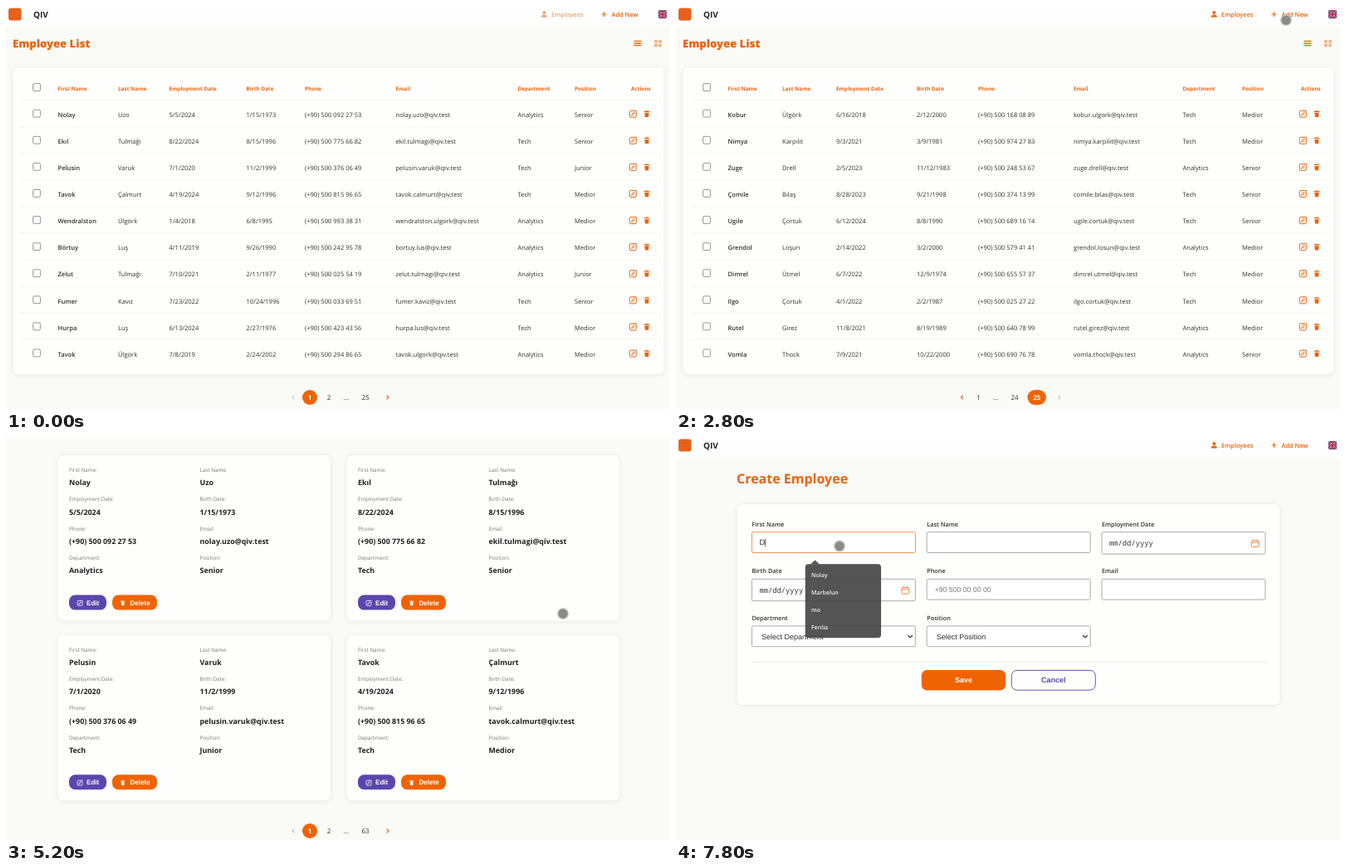
These frames come from a looping animation (800x486 px, 8 s). An HTML page:

```html
<!DOCTYPE html>
<html lang="en">
<head>
<meta charset="utf-8">
<title>Employee list</title>
<style>
html, body { margin: 0; width: 100%; height: 100%; overflow: hidden; background: #fafaf7; }
svg { display: block; width: 100%; height: 100%; font-family: "Open Sans", "Noto Sans", sans-serif; text-rendering: geometricPrecision; }
text { white-space: pre; }
</style>
</head>
<body>
<svg id="stage" viewBox="0 0 800 486"></svg>
<script>
const ORANGE = '#ec6209', FILL = '#f06303', PURPLE = '#5a46ad', INK = '#303030';
const ARIAL = 'font-family="Liberation Sans, Arial, sans-serif"';
const MONO = 'font-family="Noto Sans Mono, DejaVu Sans Mono, monospace"';
const stage = document.getElementById('stage');

// Drawing helpers
const text = (x, y, s, size, fill = INK, weight = 400, extra = '') =>
  `<text x="${x}" y="${y}" font-size="${size}" fill="${fill}" font-weight="${weight}" ${extra}>${s}</text>`;
const centered = (x, y, s, size, fill, weight, extra = '') =>
  text(x, y, s, size, fill, weight, 'text-anchor="middle" ' + extra);
const rect = (x, y, w, h, r, fill, extra = '') =>
  `<rect x="${x}" y="${y}" width="${w}" height="${h}" rx="${r}" fill="${fill}" ${extra}/>`;
const line = (d, stroke, width = 1) =>
  `<path d="${d}" fill="none" stroke="${stroke}" stroke-width="${width}" stroke-linecap="round" stroke-linejoin="round"/>`;
const group = (id, content, extra = '') => `<g id="${id}" ${extra}>${content}</g>`;
const at = (x, y, content, scale = 1) => `<g transform="translate(${x} ${y}) scale(${scale})">${content}</g>`;
const panel = (x, y, w, h) =>
  rect(x, y, w, h, 7, '#fefefd', 'stroke="#eeede9" stroke-width=".8" filter="url(#shadow)"');

// Icons, drawn around their centre
const pencil = color => line('M1 -4H-2.6Q-4 -4 -4 -2.6V2.6Q-4 4 -2.6 4H2.6Q4 4 4 2.6V-4H1', color, 1) +
  line('M-1.6 1.6L-1.2 .2L1.4 -2.2L2.2 -1.4L-.3 1.2Z', color, .9);
const trash = color => `<path fill="${color}" d="M-3.4 -3.4H-1.3V-4H1.3V-3.4H3.4V-2.3H-3.4ZM-2.6 -1.4H2.6L2.1 3.8H-2.1Z"/>`;
const person = `<circle cy="-2" r="1.9" fill="${ORANGE}"/><path fill="${ORANGE}" d="M-3.4 3.6V2.2Q-3 .6 0 .6T3.4 2.2V3.6Z"/>`;
const calendar = rect(-4.3, -3.3, 8.6, 7.6, 1, 'none', 'stroke="#ee8a45"') +
  line('M-4.3 -1H4.3M-2.2 -4.4V-3M2.2 -4.4V-3', '#ee8a45');
const flag = rect(-5, -5, 10, 10, 0, '#2c2c72') +
  line('M-4.5 -4.5L4.5 4.5M-4.5 4.5L4.5 -4.5', '#dcc8d4', 1.6) +
  line('M-4.5 -4.5L4.5 4.5M-4.5 4.5L4.5 -4.5', '#b8304c', .8) +
  `<path d="M0 -5V5M-5 0H5" stroke="#e4ccd4" stroke-width="2.4"/><path d="M0 -5V5M-5 0H5" stroke="#c0203c" stroke-width="1.6"/>`;

// Each record: first name, last name, hired, born, department, position
const records = source => source.trim().split('\n').map(row => row.trim().split(' '));
const pages = [
  records(`
    Nolay Uzo 5/5/2024 1/15/1973 A S
    Ekıl Tulmağı 8/22/2024 8/15/1996 T S
    Pelusin Varuk 7/1/2020 11/2/1999 T J
    Tavok Çalmurt 4/19/2024 9/12/1996 T M
    Wendralston Ülgörk 1/4/2018 6/8/1995 A M
    Börtuy Luş 4/11/2019 9/26/1990 A M
    Zelut Tulmağı 7/10/2021 2/11/1977 A J
    Fumer Kavız 7/23/2022 10/24/1996 T S
    Hurpa Luş 6/13/2024 2/27/1976 T M
    Tavok Ülgörk 7/8/2019 2/24/2002 A M`),
  records(`
    Helduba Plenk 8/26/2024 6/26/2000 T J
    İlgutem Corvel 6/16/2023 5/20/1978 A J
    Nuf Bılaş 12/26/2019 12/28/1983 T S
    Melva Trembol 4/13/2023 7/20/1992 A S
    Quela Sorp 4/22/2020 7/13/2004 T S
    İpşu Girez 11/11/2024 11/9/1993 A J
    Tısel Şobuk 7/20/2022 12/27/1996 A J
    Dulze Holbrenk 3/5/2018 5/5/1999 T S
    Fenlia Trembol 6/1/2020 9/22/1985 A M
    Wilpy Girez 11/19/2018 10/21/1995 A J`),
  records(`
    Kobur Ülgörk 6/16/2018 2/12/2000 T M
    Nimya Karpılıt 9/3/2021 3/9/1981 T M
    Zuge Drell 2/5/2023 11/12/1983 A S
    Çomile Bılaş 8/28/2023 9/21/1998 T S
    Ugile Çortuk 6/12/2024 8/8/1990 T S
    Grendol Loşun 2/14/2022 3/2/2000 A M
    Dimrel Ütmel 6/7/2022 12/9/1974 T M
    Ilgo Çortuk 4/1/2022 2/2/1987 T M
    Rutel Girez 11/8/2021 8/19/1989 A M
    Vomla Thock 7/9/2021 10/22/2000 A S`)
];
const columns = [
  [62.5, 135, 196.5, 289.5, 360, 469.5, 616.5, 685],
  [62.5, 127.5, 191, 286.5, 359, 472, 613, 683.5],
  [62.5, 128, 193, 290, 364, 479, 610.5, 682]
];
const labels = ['First Name', 'Last Name', 'Employment Date', 'Birth Date', 'Phone', 'Email', 'Department', 'Position'];
const DEPARTMENTS = { A: 'Analytics', T: 'Tech' };
const POSITIONS = { J: 'Junior', M: 'Medior', S: 'Senior' };

const plain = s => s.toLowerCase().normalize('NFD').replace(/[\u0300-\u036f]/g, '').replace(/ı/g, 'i');
let seed = 7;
const digits = n => {
  let s = '';
  while (n--) s += Math.floor((seed = seed * 16807 % 2147483647) / 214748365);
  return s;
};
const employees = pages.map(rows => rows.map(([first, last, hired, born, dept, pos]) => [
  first, last, hired, born,
  `(+90) 500 ${digits(3)} ${digits(2)} ${digits(2)}`,
  `${plain(first)}.${plain(last)}@qiv.test`,
  DEPARTMENTS[dept], POSITIONS[pos]
]));

// Shared parts
function titleBar(gridActive) {
  const list = line('M757 42.3H765M757 45H765M757 47.7H765', ORANGE, 1.3);
  const tiles = [781, 786].map(x => [41, 45.6].map(y => rect(x, y, 4, 3.6, .4, ORANGE)).join('')).join('');
  return text(8, 50.2, 'Employee List', 13.1, ORANGE, 800) +
    `<g opacity="${gridActive ? .45 : 1}">${list}</g><g opacity="${gridActive ? 1 : .45}">${tiles}</g>`;
}

// Page links: "*" marks the active page, "-" a disabled arrow
function pager(y, xs, names) {
  return names.split(' ').map((name, i) => {
    const x = xs[i], label = name.replace(/[*-]/, '');
    if ('‹›'.includes(label)) {
      const s = label === '‹' ? 1 : -1;
      return line(`M${x + s} ${y - 2}L${x - s} ${y}L${x + s} ${y + 2}`, name.endsWith('-') ? '#c9c8c6' : ORANGE, 1.1);
    }
    if (!name.endsWith('*')) return centered(x, y + 3, label, 8);
    const w = label.length > 1 ? 22.5 : 18;
    return rect(x - w / 2, y - 9, w, 18, 9, FILL) + centered(x, y + 2.9, label, 8, '#fff', 700);
  }).join('');
}
const FIRST_PAGE_XS = [346, 366, 389, 410, 433, 460];
const pagers = [
  pager(472, FIRST_PAGE_XS, '‹- 1* 2 ... 25 ›'),
  pager(472, [335, 355, 377.5, 400, 421, 444, 471.5], '‹ 1 2* 3 ... 25 ›'),
  pager(472, [344.5, 364.5, 385, 408, 434.7, 462], '‹ 1 ... 24 25* ›-')
];

function table(page) {
  const xs = columns[page];
  const box = y => rect(32.6, y - 4.4, 8.8, 8.8, 1.4, '#fff', 'stroke="#8b8b8b" stroke-width=".9"');
  let out = titleBar(false) + panel(8, 73.5, 785, 371) + box(98) + text(753, 101.5, 'Actions', 6.4, ORANGE, 700);
  labels.forEach((label, c) => out += text(xs[c], 101.5, label, 6.4, ORANGE, 700));
  employees[page].forEach((person, r) => {
    const y = 131 + 32.1 * r;
    out += `<path d="M17 ${y - 17.5}H784" stroke="#f3f2ef" stroke-width=".8"/>` + box(y - 1.4) +
      at(755.3, y - .8, pencil(ORANGE)) + at(772, y - .8, trash(ORANGE));
    person.forEach((value, c) => out += text(xs[c], y + 2.8, value, 7.55, INK, c ? 400 : 600));
  });
  return out + pagers[page];
}

function card(person, x, y) {
  let out = panel(x, y, 329.5, 200.5);
  person.forEach((value, i) => {
    const cx = x + 14 + (i % 2) * 157.5, cy = y + 20.3 + Math.floor(i / 2) * 35.4;
    out += text(cx, cy, labels[i] + ':', 6.3, '#777') + text(cx, cy + 16.3, value, 8.9, '#202020', 700);
  });
  return out +
    rect(x + 14, y + 169, 45, 18, 7.5, PURPLE) + at(x + 27, y + 178.8, pencil('#fff'), .75) +
    text(x + 35, y + 181, 'Edit', 8.1, '#fff', 700, ARIAL) +
    rect(x + 66, y + 169, 54, 18, 7.5, FILL) + at(x + 78.7, y + 178.8, trash('#fff'), .75) +
    text(x + 87.5, y + 181, 'Delete', 8.1, '#fff', 700, ARIAL);
}
const cards = () => titleBar(true) +
  employees[0].slice(0, 4).map((p, i) => card(p, 62 + 348 * (i % 2), 82 + 216.7 * Math.floor(i / 2))).join('') +
  pager(535.4, FIRST_PAGE_XS, '‹- 1* 2 ... 63 ›');

function field(col, row, label, kind, hint = '', id = '') {
  const x = 91.4 + 210.8 * col, y = 114.7 + 56.6 * row, h = kind === 'date' ? 26.4 : 24.8;
  let out = text(x, y - 7.2, label, 7.35, INK, 600) +
    rect(x, y, 197, h, 1.6, '#fff', `id="${id}" stroke="#a2a2a2" stroke-width=".9"`);
  if (kind === 'date') out += text(x + 9, y + 16.5, 'mm/dd/yyyy', 8.8, INK, 400, MONO) + at(x + 185, y + 13.5, calendar);
  if (kind === 'input') out += text(x + 9.5, y + 15.6, hint, 8.7, '#777', 400, ARIAL);
  if (kind === 'select') out += text(x + 11.5, y + 16, hint, 9, INK, 400, ARIAL) +
    line(`M${x + 188.4} ${y + 11.6}l2.4 2.4l2.4 -2.4`, INK, 1.2);
  return out;
}
const form = () => text(73, 56.3, 'Create Employee', 16, ORANGE, 700) + panel(73, 80.5, 655, 243) +
  field(0, 0, 'First Name', 'input', '', 'firstName') + field(1, 0, 'Last Name', 'input') +
  field(2, 0, 'Employment Date', 'date') + field(0, 1, 'Birth Date', 'date') +
  field(1, 1, 'Phone', 'input', '+90 500 00 00 00') + field(2, 1, 'Email', 'input') +
  field(0, 2, 'Department', 'select', 'Select Department') + field(1, 2, 'Position', 'select', 'Select Position') +
  `<path d="M91.5 271.3H710" stroke="#e6e4e0" stroke-width=".9"/>` +
  rect(295.8, 281, 101.3, 24.4, 6.5, FILL) + centered(346.5, 296.2, 'Save', 9, '#fff', 700, ARIAL) +
  rect(404.3, 281.4, 101, 23.8, 6.5, '#fefefd', `stroke="${PURPLE}" stroke-width=".9"`) +
  centered(454.8, 296.2, 'Cancel', 9, PURPLE, 700, ARIAL) +
  group('typed', text(100.5, 130.3, 'D', 9.2, INK, 400, ARIAL)) +
  group('caret', '<path d="M0 122.5V132" stroke="#222" stroke-width=".8"/>') +
  group('suggestions',
    `<path d="M162 153.5L167.5 148.5L173 153.5Z" fill="#484848"/>` + rect(155.7, 153.2, 91.4, 89, 4, '#484848') +
    ['Nolay', 'Marbelun', 'mo', 'Fenlia'].map((s, i) => text(163, 169 + 21.1 * i, s, 7, '#f0f0f0', 600)).join(''));

const nav = rect(0, 0, 800, 25.5, 0, '#fefefe') + rect(3, 2.5, 15.5, 15, 3, '#e8611c') +
  text(33, 13.5, 'QIV', 10, '#222', 700) +
  group('employeesLink', at(648.3, 10, person) + text(657, 13, 'Employees', 7.45, ORANGE, 600)) +
  line('M718 10H723M720.5 7.5V12.5', ORANGE, 1.1) + text(729.5, 13, 'Add New', 7.45, ORANGE, 600) +
  group('addSelection', rect(716, 4, 47, 12.5, 0, '#a4dcec') + text(729.5, 13, 'Add New', 7.45, '#b08a6c', 600)) +
  at(791, 10, flag);

const scenes = { page1: table(0), page2: table(1), page25: table(2), cards: cards(), form: form() };
stage.innerHTML =
  `<defs><filter id="shadow" x="-5%" y="-5%" width="110%" height="115%">
    <feDropShadow dx="0" dy="1" stdDeviation="2.5" flood-color="#000" flood-opacity=".05"/></filter></defs>` +
  rect(0, 0, 800, 486, 0, '#fafaf7') +
  group('content', nav + Object.entries(scenes).map(([id, s]) => group(id, s)).join('') +
    group('pageSelection', rect(368, 463, 19, 18.5, 0, '#a4d8ec') +
      '<circle cx="377.5" cy="472" r="9" fill="#c08a55"/>' + centered(377.5, 474.9, '2', 8, '#fff', 700))) +
  group('cursor', '<circle id="dot" r="6.2" stroke="#c2c2be" stroke-width="1.4"/>');

// Motion
const el = id => document.getElementById(id);
const show = (id, on) => el(id).setAttribute('display', on ? 'inline' : 'none');
const path = [[200, 600, 150], [800, 381, 472], [1200, 381, 472], [1600, 444, 472], [2000, 444, 472],
  [2800, 735, 17], [3300, 785, 45], [3900, 785, 45], [4600, 678.5, 174.5], [5200, 671, 213],
  [5500, 671, 213], [6000, 724, 15], [6400, 724, 15], [7100, 197, 131.5], [8000, 197, 131.5]];
const clicks = [900, 1700, 3700, 6100, 7150];
const sceneTimes = [[0, 'page1'], [800, 'page2'], [1800, 'page25'], [3800, 'cards'], [6200, 'form']];
const ease = p => { p = Math.min(1, Math.max(0, p)); return p * p * (3 - 2 * p); };

function cursorAt(t) {
  const i = Math.max(1, path.findIndex(p => p[0] > t));
  const [t0, x0, y0] = path[i - 1], [t1, x1, y1] = path[i], p = ease((t - t0) / (t1 - t0));
  return [x0 + (x1 - x0) * p, y0 + (y1 - y0) * p];
}

function draw(now) {
  const t = now % 8000;
  const scene = sceneTimes.filter(s => s[0] <= t).pop()[1];
  Object.keys(scenes).forEach(id => show(id, id === scene));

  const scroll = 60.4 * (ease((t - 4800) / 400) - ease((t - 5400) / 400));
  el('content').setAttribute('transform', `translate(0 ${-scroll})`);

  el('employeesLink').setAttribute('opacity', t < 200 ? .6 : 1);
  show('pageSelection', t >= 1000 && t < 1600);
  show('addSelection', t >= 6200 && t < 7200);

  const focused = t >= 7200, typed = t >= 7800;
  el('firstName').setAttribute('stroke', focused ? '#ee8a45' : '#a2a2a2');
  show('typed', typed);
  show('caret', focused);
  el('caret').setAttribute('transform', `translate(${typed ? 107.4 : 101} 0)`);
  show('suggestions', t >= 7400);
  el('suggestions').setAttribute('opacity', typed ? .93 : 1);

  const [x, y] = cursorAt(t);
  show('cursor', t >= 200);
  el('cursor').setAttribute('transform', `translate(${x} ${y})`);
  const pressed = clicks.some(c => t >= c && t < c + 250);
  el('dot').setAttribute('fill', pressed ? '#5c5c5c' : '#8a8a88');
}

const start = performance.now();
(function loop() {
  draw(performance.now() - start);
  requestAnimationFrame(loop);
})();
</script>
</body>
</html>
```
